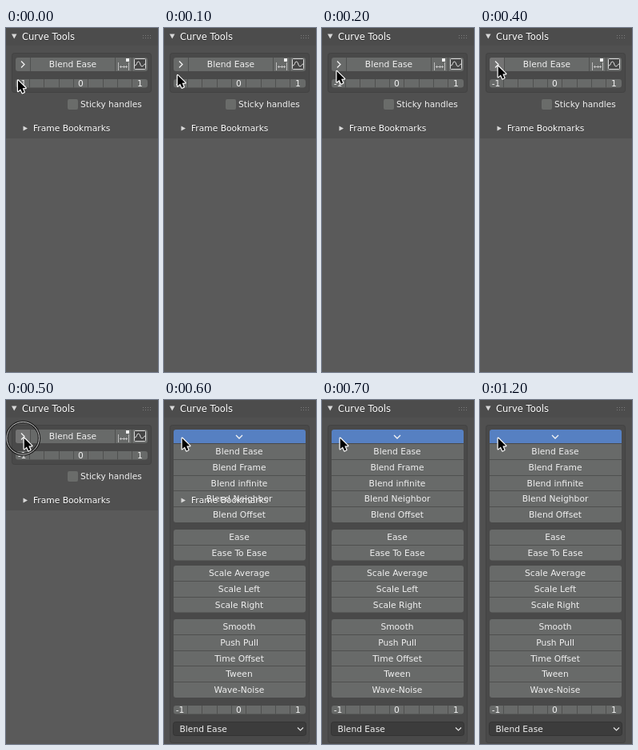
Recreate the animation shown at these times as an HTML page with a canvas. Size 190 by 430 pixels, loop 1600 ms.

```html
<!DOCTYPE html>
<html lang="en">
<head>
<meta charset="utf-8">
<title>Curve Tools panel</title>
<style>
html, body { margin: 0; width: 100%; height: 100%; overflow: hidden; background: #5a5a5a; }
canvas { display: block; width: 190px; height: 430px; }
</style>
</head>
<body>
<canvas id="stage" width="190" height="430"></canvas>
<script>
const ctx = document.getElementById('stage').getContext('2d');
const LOOP = 1600, STEP = 100;
const FONT = '"DejaVu Sans", sans-serif';
const C = {
  region: '#5a5a5a', panel: '#505050', header: '#4c4c4c', box: '#494949',
  edge: '#424242', button: '#686a69', line: '#4f504f', text: '#f0f0f0',
  active: '#5680c2', menu: '#3c3c3c'
};
const groups = [
  [55, ['Blend Ease', 'Blend Frame', 'Blend infinite', 'Blend Neighbor', 'Blend Offset']],
  [162, ['Ease', 'Ease To Ease']],
  [207, ['Scale Average', 'Scale Left', 'Scale Right']],
  [274, ['Smooth', 'Push Pull', 'Time Offset', 'Tween', 'Wave-Noise']]
];
// Pointer tip at each 100 ms step; it rests on the last point.
const path = [[15, 65.5], [17, 59], [18.5, 54], [21, 50], [22.7, 47.7]];

function rect(x, y, w, h, fill) {
  ctx.fillStyle = fill;
  ctx.fillRect(x, y, w, h);
}

function round(x, y, w, h, r, fill, stroke) {
  ctx.beginPath();
  ctx.roundRect(x, y, w, h, r);
  ctx.fillStyle = fill;
  ctx.fill();
  if (stroke) {
    ctx.strokeStyle = stroke;
    ctx.lineWidth = 1;
    ctx.stroke();
  }
}

function text(str, x, y, align = 'left', size = 10.7, color = C.text) {
  ctx.font = `${size}px ${FONT}`;
  ctx.textAlign = align;
  ctx.fillStyle = color;
  ctx.fillText(str, x, y);
}

function title(str, x, y, size) {
  text(str, x, y + 1, 'left', size, 'rgba(0, 0, 0, 0.4)');
  text(str, x, y, 'left', size, '#ffffff');
}

function line(points, color = '#e4e4e4', width = 1.2) {
  ctx.beginPath();
  points.forEach(([x, y]) => ctx.lineTo(x, y));
  ctx.strokeStyle = color;
  ctx.lineWidth = width;
  ctx.stroke();
}

function shape(points, fill) {
  ctx.beginPath();
  points.forEach(([x, y]) => ctx.lineTo(x, y));
  ctx.closePath();
  ctx.fillStyle = fill;
  ctx.fill();
}

function header() {
  rect(0, 0, 190, 22, C.header);
  shape([[7, 7.5], [13.5, 7.5], [10.25, 13.5]], '#d8d8d8');
  title('Curve Tools', 20, 15, 11.5);
  for (let x = 171; x < 183; x += 3) {
    rect(x, 9, 1, 1, '#7c7c7c');
    rect(x, 12, 1, 1, '#7c7c7c');
  }
}

function slider(y) {
  round(12, y, 165, 10.5, 3, C.button);
  for (let i = 1; i < 9; i++) rect(Math.floor(11 + i * 165 / 9), y, 1, 10.5, C.line);
  text('-1', 20, y + 9, 'center');
  text('0', 93.5, y + 9, 'center');
  text('1', 167.5, y + 9, 'center');
}

function bookmarks() {
  shape([[21.5, 122.5], [21.5, 128.5], [27, 125.5]], '#d8d8d8');
  title('Frame Bookmarks', 34, 129, 10.7);
}

function keyIcon() {
  const gray = '#bdbdbd';
  for (const x of [140.5, 153.5]) line([[x, 43], [x, 53]], gray, 1);
  line([[142, 48.5], [152, 48.5]], gray, 1);
  for (const x of [143.5, 147.5, 150.5]) line([[x, 47], [x, 50]], gray, 1);
  rect(150, 38, 4, 4, '#f2f2f2');
}

function graphIcon() {
  round(160.5, 38.5, 14, 13, 1, '#454545', '#d8d8d8');
  ctx.beginPath();
  ctx.moveTo(161, 47);
  ctx.bezierCurveTo(164, 47, 163, 42, 165.5, 42);
  ctx.bezierCurveTo(168, 42, 167.5, 48, 170, 48);
  ctx.bezierCurveTo(172, 48, 172, 45, 174, 45);
  ctx.strokeStyle = '#e4e4e4';
  ctx.stroke();
}

function closedPanel(hover) {
  rect(0, 0, 190, 430, C.region);
  rect(0, 0, 190, 138, C.panel);
  rect(0, 137, 190, 1, C.line);
  header();
  round(7.5, 31.5, 174, 49, 3, C.box, C.edge);
  round(12, 37, 165, 17, 3, C.button);
  if (hover) round(12, 37, 18, 17, [3, 0, 0, 3], '#737373');
  for (const x of [30, 136, 157]) rect(x, 37, 1, 17, C.line);
  line([[19, 41.5], [23, 45.5], [19, 49.5]], '#f0f0f0', 1.3);
  text('Blend Ease', 83.5, 49, 'center');
  keyIcon();
  graphIcon();
  slider(64);
  round(77, 89, 13, 13, 2, '#6a6c6a');
  text('Sticky handles', 93, 99, 'left', 10.6);
  bookmarks();
}

function openPanel(ghost) {
  rect(0, 0, 190, 430, C.panel);
  header();
  round(7.5, 31.5, 174, 397, 3, C.box, C.edge);
  round(12, 37, 165, 17, [3, 3, 0, 0], C.active);
  line([[90, 44], [94, 48], [98, 44]], '#f4f4f4', 1.3);
  groups.forEach(([top, names], g) => {
    const h = names.length * 19.8 - 1;
    round(12, top, 165, h, g ? 3 : [0, 0, 3, 3], C.button);
    names.forEach((name, i) => {
      const y = Math.round(top + i * 19.8);
      if (i) rect(12, y - 1, 165, 1, C.line);
      text(name, 94, y + 13, 'center');
    });
  });
  slider(382);
  round(11.5, 402.5, 166, 17, 3, C.menu, '#343434');
  text('Blend Ease', 19.5, 415);
  line([[167, 409.5], [170.5, 413], [174, 409.5]], '#e4e4e4', 1.2);
  if (ghost) bookmarks();
}

function ring(x, y) {
  for (const [color, width] of [['#202020', 3.4], ['#c8c8c8', 1]]) {
    ctx.beginPath();
    ctx.arc(x, y, 20.3, 0, Math.PI * 2);
    ctx.strokeStyle = color;
    ctx.lineWidth = width;
    ctx.stroke();
  }
}

function pointer(x, y) {
  ctx.save();
  ctx.translate(x, y);
  ctx.beginPath();
  [[0, 0], [0, 13.5], [3.2, 10.7], [5.5, 15.7], [7.7, 14.6], [5.6, 9.8], [9.6, 9.6]]
    .forEach(([px, py]) => ctx.lineTo(px, py));
  ctx.closePath();
  ctx.lineJoin = 'round';
  ctx.strokeStyle = '#ffffff';
  ctx.lineWidth = 2.4;
  ctx.stroke();
  ctx.fillStyle = '#000000';
  ctx.fill();
  ctx.restore();
}

function draw(ms) {
  const step = Math.floor(ms / STEP);
  const [x, y] = path[Math.min(step, path.length - 1)];
  if (step < 6) closedPanel(step > 2);
  else openPanel(step === 6);
  if (step === 5) ring(21.2, 47.7);
  pointer(x, y);
}

const start = performance.now();
function tick() {
  draw((performance.now() - start) % LOOP);
  requestAnimationFrame(tick);
}
tick();
</script>
</body>
</html>
```
